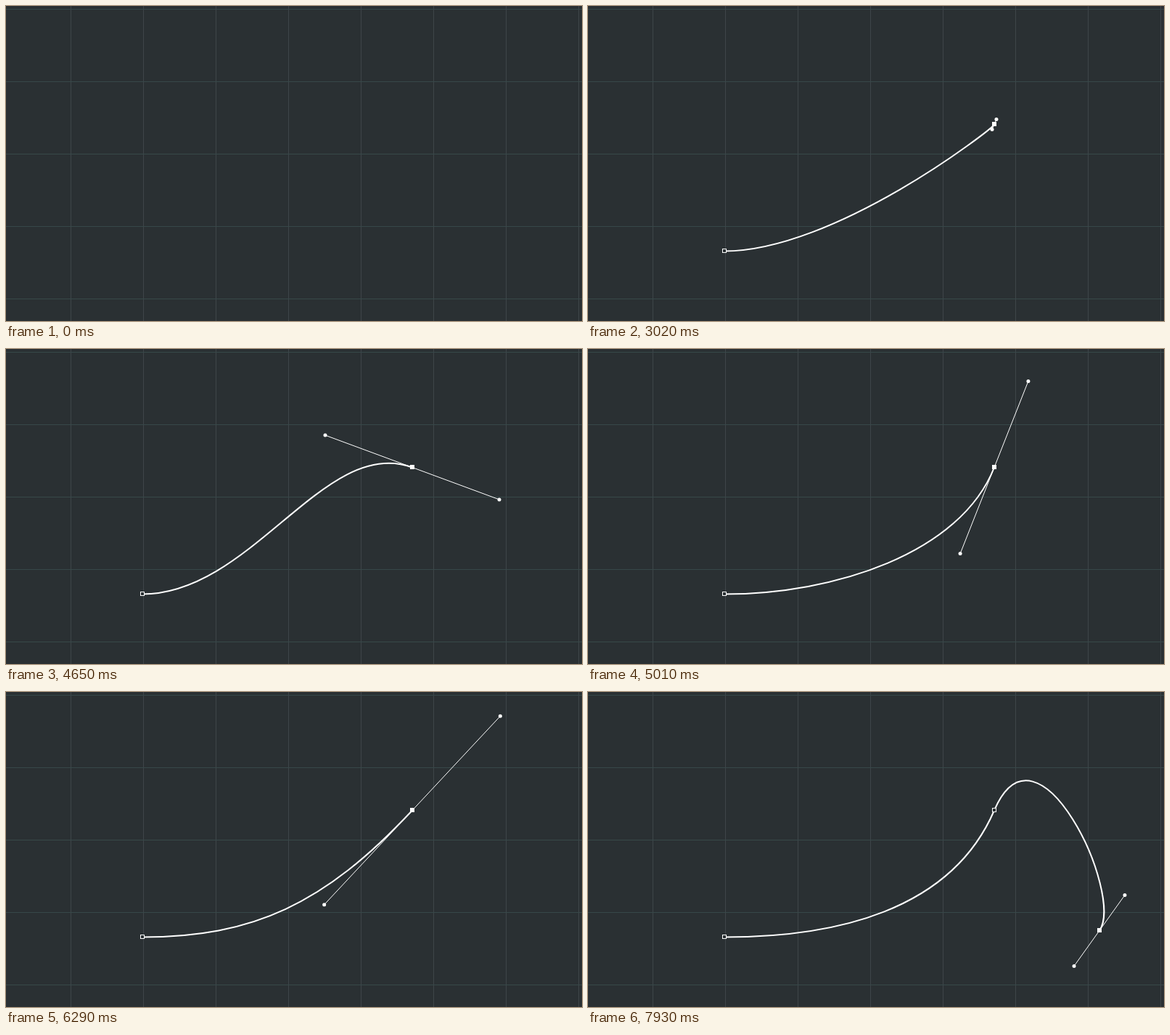
An HTML page with a canvas that plays this animation: 794 px wide and 435 px high, repeating every 8 s.

```html
<!DOCTYPE html>
<html lang="en">
<head>
<meta charset="utf-8">
<title>Pen tool</title>
<style>
html, body { margin: 0; height: 100%; overflow: hidden; background: #2a3033; }
canvas { display: block; }
</style>
</head>
<body>
<canvas id="stage" width="794" height="435"></canvas>
<script>
const LOOP = 8000;
const BG = '#2a3033';
const WHITE = '#fff';
const ctx = document.getElementById('stage').getContext('2d');

const lerp = (a, b, u) => a + (b - a) * u;
const smooth = u => u * u * (3 - 2 * u);
const easeOut = u => 1 - (1 - u) ** 4;

const nodes = [[188, 338], [560, 163], [705, 329]];

// Each drag moves a node's handle between two polar points [degrees, length].
// swing: how far it turns out and back; swell: extra length late in the drag.
const drags = [
  { node: 0, start: 950, step: 48.8, count: 18, from: [0, 0], to: [0, 151.5], swing: -2 },
  { node: 1, start: 3020, step: 48.5, count: 15, from: [-67, 6], to: [-57.6, 126.5] },
  { node: 1, start: 3970, step: 47.2, count: 23, from: [-57.6, 124], to: [-68.5, 128],
    swing: 108.8, grow: easeOut },
  { node: 1, start: 5370, step: 47, count: 23.85, from: [-68.5, 128], to: [-66.7, 152],
    swing: 84, swell: 108, grow: easeOut },
  { node: 2, start: 7320, step: 50.8, count: 13, from: [125, 5], to: [125.5, 60.2] }
];

function handleAt({ start, step, count, from, to, swing = 0, swell = 0, grow = smooth }, t) {
  const u = Math.min(1, (Math.floor((t - start) / step) + 1) / count);
  const wave = Math.sin(Math.PI * u);
  const angle = (lerp(from[0], to[0], smooth(u)) + swing * wave ** 2) * Math.PI / 180;
  const length = lerp(from[1], to[1], grow(u)) + swell * u ** 4 * wave;
  return [length * Math.cos(angle), length * Math.sin(angle)];
}

function drawGrid() {
  ctx.fillStyle = BG;
  ctx.fillRect(0, 0, 794, 435);
  ctx.fillStyle = '#3e4549';
  for (let x = 89; x < 794; x += 100) ctx.fillRect(x, 0, 1, 435);
  ctx.fillStyle = '#374849';
  for (let y = 4; y < 435; y += 100) ctx.fillRect(0, y, 794, 1);
}

function drawCurve(handles) {
  ctx.lineWidth = 2;
  ctx.beginPath();
  ctx.moveTo(...nodes[0]);
  for (let i = 1; i < handles.length; i++) {
    const [ax, ay] = nodes[i - 1], [bx, by] = nodes[i];
    const [ox, oy] = handles[i - 1], [ix, iy] = handles[i];
    ctx.bezierCurveTo(ax + ox, ay + oy, bx - ix, by - iy, bx, by);
  }
  ctx.stroke();
}

function drawHandles([x, y], [dx, dy]) {
  ctx.lineWidth = 1;
  ctx.beginPath();
  ctx.moveTo(x - dx, y - dy);
  ctx.lineTo(x + dx, y + dy);
  ctx.stroke();
  ctx.fillStyle = WHITE;
  for (const side of [-1, 1]) {
    ctx.beginPath();
    ctx.arc(x + side * dx, y + side * dy, 2.5, 0, 7);
    ctx.fill();
  }
}

function drawSquare([x, y], filled) {
  ctx.fillStyle = WHITE;
  ctx.fillRect(x - 3, y - 3, 6, 6);
  if (filled) return;
  ctx.fillStyle = BG;
  ctx.fillRect(x - 2, y - 2, 4, 4);
}

function draw(t) {
  drawGrid();
  const handles = [];
  for (const drag of drags) {
    if (t >= drag.start) handles[drag.node] = handleAt(drag, t);
  }
  if (!handles.length) return;
  const active = handles.length - 1;

  ctx.save();
  ctx.translate(0, 0.5);
  ctx.strokeStyle = WHITE;
  drawCurve(handles);
  drawHandles(nodes[active], handles[active]);
  ctx.restore();
  handles.forEach((h, i) => drawSquare(nodes[i], i === active));
}

function frame() {
  draw(performance.now() % LOOP);
  requestAnimationFrame(frame);
}
frame();
</script>
</body>
</html>
```
